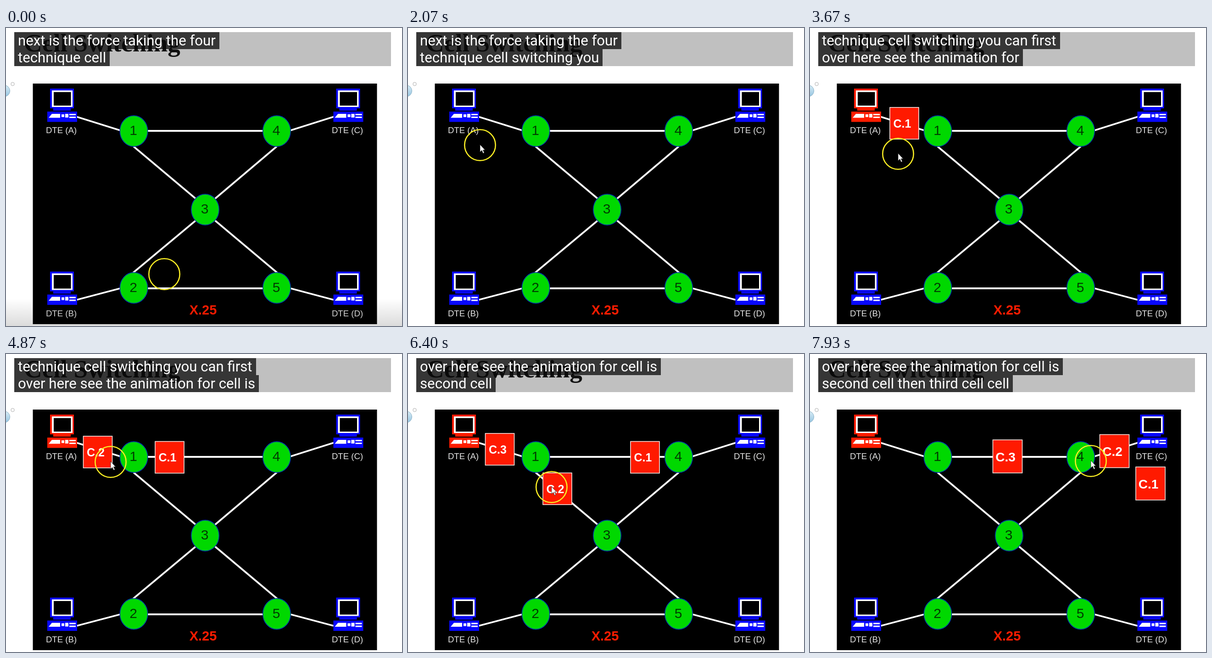
Write an HTML page with a canvas that moves like this. It is 863 px wide and 649 px high and loops after 8000 ms.

```html
<!DOCTYPE html>
<html lang="en">
<head>
<meta charset="utf-8">
<title>Cell Switching</title>
<style>
html, body { margin: 0; width: 100%; height: 100%; overflow: hidden; background: #fff; }
canvas { display: block; }
</style>
</head>
<body>
<canvas id="stage" width="863" height="649"></canvas>
<script>
const g = document.getElementById('stage').getContext('2d');
const LOOP = 8000, BLUE = '#0808ff', RED = '#ff1c00';
const SANS = '"Liberation Sans", Arial, sans-serif';

// Each caption line: [time, words added]
const captions = [
  [[0, 'next is the force taking the four']],
  [[0, 'technique cell'], [1600, ' switching'], [1930, ' you'], [2200, ' can first']],
  [[2530, 'over'], [3000, ' here see'], [3200, ' the animation'], [3670, ' for'], [4400, ' cell'], [4670, ' is']],
  [[5400, 'second'], [6330, ' cell'], [6870, ' then'], [7330, ' third'], [7530, ' cell'], [7800, ' cell']]
];
const rolls = [2537, 5400];
const LINE = 37, ROLL = 205;

// Pointer path: [time, x, y]
const path = [
  [0, 345, 536], [1260, 345, 536], [1400, 342, 494], [2060, 157, 255], [3000, 157, 255],
  [3270, 184, 277], [3670, 192, 274], [3930, 192, 277], [4060, 190, 242], [4330, 195, 236],
  [4730, 245, 235], [4860, 228, 235], [5060, 228, 235], [5130, 194, 233], [5270, 194, 233],
  [5670, 231, 218], [5860, 231, 218], [5930, 340, 296], [6260, 340, 296], [6400, 313, 290],
  [6930, 294, 264], [7060, 294, 264], [7130, 410, 215], [7270, 410, 215], [7930, 612, 233],
  [8000, 612, 233]
];

// Each cell hops between places: [time, x, y]
const cells = [
  [[3270, 205.5, 207.5], [4070, 356.5, 225], [5470, 516.5, 225], [6670, 656, 211], [7470, 742, 282]],
  [[4730, 200, 213.5], [5470, 325.5, 293.5], [6670, 508, 310], [7470, 663.5, 211.5]],
  [[5470, 200, 207.5], [7470, 430.5, 223]]
];
const BIG_CELLS = 7470;

const nodes = [[278.5, 224.5], [278.5, 566], [434, 395.5], [590, 224.5], [590, 566]];
const links = [
  [153, 193, 249, 223], [309, 224, 560, 224], [620, 223, 715, 193],
  [278, 258, 415, 373], [590, 258, 454, 373], [415, 418, 277, 533],
  [454, 418, 591, 533], [309, 567, 560, 567], [154, 592, 249, 567], [620, 567, 714, 592]
];
const stations = [['A', 0, 0], ['B', 0, 398.5], ['C', 623.5, 0], ['D', 623.5, 398.5]];

function rect(color, x, y, w, h) {
  g.fillStyle = color;
  g.fillRect(x, y, w, h);
}

function text(str, x, y, font, color, align = 'left') {
  g.font = font;
  g.fillStyle = color;
  g.textAlign = align;
  g.fillText(str, x, y);
}

function oval(x, y, rx, ry, fill, stroke, width) {
  g.beginPath();
  g.ellipse(x, y, rx, ry, 0, 0, 2 * Math.PI);
  if (fill) { g.fillStyle = fill; g.fill(); }
  if (stroke) { g.strokeStyle = stroke; g.lineWidth = width; g.stroke(); }
}

function poly(color, points) {
  g.beginPath();
  points.forEach(p => g.lineTo(...p));
  g.closePath();
  g.fillStyle = color;
  g.fill();
}

function station(name, dx, dy, color) {
  g.save();
  g.translate(dx, dy);
  rect(color, 96, 132, 52, 43);
  rect('#fff', 100, 136, 45, 36);
  rect('#000', 104, 139.5, 37.5, 29.5);
  rect(color, 103, 175, 38, 5);
  rect(color, 90, 182, 65, 22.5);
  poly('#fff', [[93, 195.5], [100, 187], [118, 187], [118, 195.5]]);
  rect('#fff', 121, 188, 6, 6);
  rect('#fff', 129, 187, 7, 8);
  rect('#fff', 138, 187, 14, 3);
  rect('#fff', 138, 193, 14, 3);
  text(`DTE (${name})`, 120.5, 229, '18.6px ' + SANS, '#e4e4e4', 'center');
  g.restore();
}

function caption(t) {
  const roll = rolls.reduce((sum, r) => sum + Math.min(1, Math.max(0, (t - r) / ROLL)), 0);
  g.save();
  g.beginPath();
  g.rect(18, 9, 821, 74);
  g.clip();
  captions.forEach((parts, i) => {
    const str = parts.filter(p => p[0] <= t).map(p => p[1]).join('');
    if (!str) return;
    const y = Math.round(9 + LINE * (i - roll));
    g.font = '31.2px Roboto, sans-serif';
    rect('rgba(8,8,8,.75)', 18, y, Math.round(g.measureText(str).width) + 16, LINE);
    text(str, 26, y + 29, g.font, '#fff');
  });
  g.restore();
}

function cell(hops, i, t) {
  const hop = hops.filter(h => h[0] <= t).pop();
  if (!hop) return;
  const [, x, y] = hop, big = t >= BIG_CELLS;
  const w = big ? 64 : 63, h = big ? 72 : 69;
  rect('#ff1a00', x - w / 2, y - h / 2, w, h);
  g.strokeStyle = '#ffe8e4';
  g.lineWidth = 1.6;
  g.strokeRect(x - w / 2, y - h / 2, w, h);
  text('C.' + (i + 1), x - 4.5, y + (big ? 10.5 : 9), `bold ${big ? 28 : 25}px ${SANS}`, '#fff', 'center');
}

function pointer(t) {
  const i = Math.max(1, path.findIndex(p => p[0] >= t));
  const [t0, x0, y0] = path[i - 1], [t1, x1, y1] = path[i];
  const k = (t - t0) / (t1 - t0);
  const x = x0 + (x1 - x0) * k, y = y0 + (y1 - y0) * k;
  oval(x, y, 33.7, 33.7, null, '#f8ec24', 2.6);
  if (t < 2000) return;
  const arrow = [[0, 0], [0, 16], [4, 12.5], [6.5, 19], [9.2, 18], [6.5, 11.8], [11, 11.8]];
  poly('#fff', arrow.map(([a, b]) => [x + a, y + b - 1]));
  g.strokeStyle = '#222';
  g.lineWidth = 0.8;
  g.stroke();
}

function shade(t) {
  const alpha = 0.14 * Math.min(1, Math.max(0, (930 - t) / 450));
  if (!alpha) return;
  const fade = g.createLinearGradient(0, 590, 0, 649);
  fade.addColorStop(0, 'rgba(0,0,0,0)');
  fade.addColorStop(1, `rgba(0,0,0,${alpha})`);
  rect(fade, 0, 590, 863, 59);
}

function draw(t) {
  rect('#fff', 0, 0, 863, 649);
  rect('#c0c0c0', 18, 9, 821, 74);
  text('Cell Switching', 39, 51, 'bold 55px "Liberation Serif", "Times New Roman", serif', '#111');
  caption(t);

  const ball = g.createLinearGradient(0, 125, 0, 150);
  ball.addColorStop(0, '#d8ecf6');
  ball.addColorStop(1, '#94c4e0');
  oval(-4, 137, 12.5, 12.5, ball, '#86aec4', 1);
  oval(14.5, 122, 3.7, 3.7, '#fff', '#aaa', 1);

  rect('#000', 58.5, 121, 750, 524);
  g.strokeStyle = '#fff';
  g.lineWidth = 3.8;
  for (const [x0, y0, x1, y1] of links) {
    g.beginPath();
    g.moveTo(x0, y0);
    g.lineTo(x1, y1);
    g.stroke();
  }
  stations.forEach(([name, x, y]) => station(name, x, y, name === 'A' && t >= 2470 ? RED : BLUE));
  nodes.forEach(([x, y], i) => {
    oval(x, y, 30.3, 33.6, '#00d800', '#0038a8', 1.6);
    text(i + 1, x - 1, y + 8.5, '30px ' + SANS, '#003c00', 'center');
  });
  text('X.25', 429.5, 623.5, 'bold 29px ' + SANS, RED, 'center');

  cells.forEach((hops, i) => cell(hops, i, t));
  pointer(t);
  shade(t);
}

// The picture advances 15 times a second
function tick() {
  const t = performance.now() % LOOP;
  draw(Math.min(LOOP - 1, Math.floor(t * 0.015 + 0.1) / 0.015 + 5));
  requestAnimationFrame(tick);
}
tick();
</script>
</body>
</html>
```
